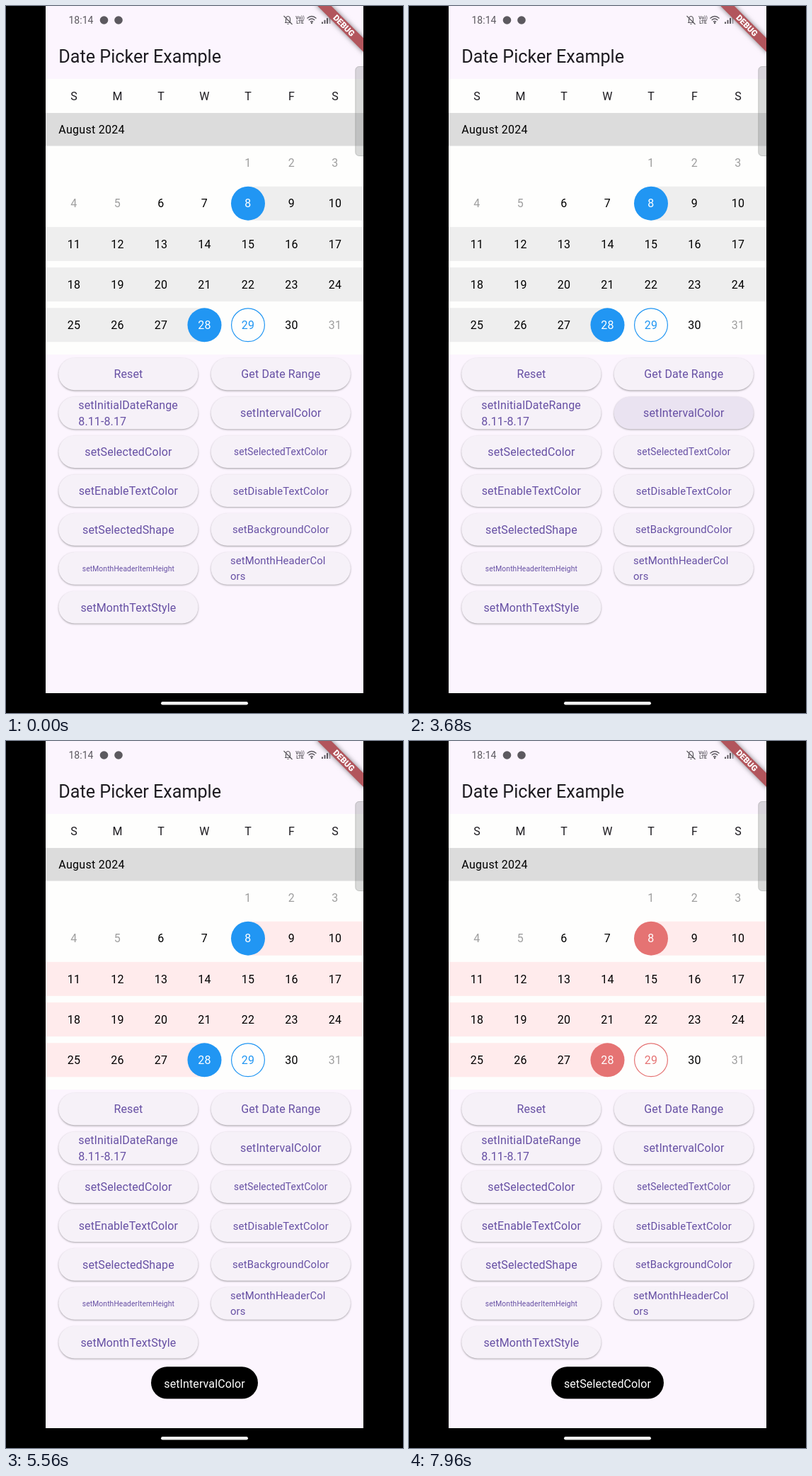
Write an HTML page with a canvas that moves like this. It is 561 by 998 pixels and loops after 8 s.

```html
<!DOCTYPE html>
<html lang="en">
<head>
<meta charset="utf-8">
<title>Date Picker Example</title>
<style>
html, body { margin: 0; width: 100%; height: 100%; overflow: hidden; background: #000; }
canvas { display: block; width: 561px; height: 998px; }
</style>
</head>
<body>
<canvas id="stage" width="561" height="998"></canvas>
<script>
const ctx = document.getElementById('stage').getContext('2d');
const LOOP = 8000;
const UNIT = 449 / 392.7; // stage pixels per logical pixel
const LEFT = 56, RIGHT = 505, BOTTOM = 970;
const BODY = 14 * UNIT;
const INK = '#1d1b20', PURPLE = '#6750a4';
const BUTTON = { width: 197.2, height: 45.7, top: 496.6, step: 54.87, columns: [74.3, 289.7] };

// Labels in reading order, two per row: [lines, logical font size]
const BUTTONS = [
  [['Reset'], 14], [['Get Date Range'], 14],
  [['setInitialDateRange', '8.11-8.17'], 14], [['setIntervalColor'], 14],
  [['setSelectedColor'], 14], [['setSelectedTextColor'], 12],
  [['setEnableTextColor'], 14], [['setDisableTextColor'], 13],
  [['setSelectedShape'], 14], [['setBackgroundColor'], 13],
  [['setMonthHeaderItemHeight'], 9], [['setMonthHeaderCol', 'ors'], 13],
  [['setMonthTextStyle'], 14],
];
const TAPS = [
  { button: 3, press: 3480, release: 3715 },
  { button: 4, press: 5570, release: 6080 },
];
const TOAST_TIME = 2000, TOAST_FADE = 256;

const clamp = v => Math.max(0, Math.min(1, v));
const ramp = (t, from, to) => clamp((t - from) / (to - from));
const smooth = v => v * v * (3 - 2 * v);
const decelerate = v => 1 - (1 - v) ** 2;

function text(str, x, y, { size = BODY, color = INK, align = 'center', spacing = 0.11, weight = 400 } = {}) {
  ctx.font = `${weight} ${size}px Roboto, sans-serif`;
  ctx.letterSpacing = `${spacing}px`;
  ctx.textAlign = align;
  ctx.fillStyle = color;
  ctx.fillText(str, x, y + size * 0.35);
}

function rect(x, y, w, h, color) {
  ctx.fillStyle = color;
  ctx.fillRect(x, y, w, h);
}

function pill(x, y, w, h, color, radius = h / 2) {
  ctx.beginPath();
  ctx.roundRect(x, y, w, h, radius);
  ctx.fillStyle = color;
  ctx.fill();
}

function disc(x, y, r, color) {
  ctx.beginPath();
  ctx.arc(x, y, r, 0, Math.PI * 2);
  ctx.fillStyle = color;
  ctx.fill();
}

function strokePath(path, color, width) {
  ctx.strokeStyle = color;
  ctx.lineWidth = width;
  ctx.stroke(new Path2D(path));
}

function drawStatusBar() {
  const gray = '#5c595f';
  text('18:14', 88.5, 20, { size: 14, color: gray, align: 'left', spacing: 0 });
  disc(138.5, 20, 5.8, gray);
  disc(159, 20, 5.8, gray);
  strokePath('M394 23.5H403M395.5 23V18.5Q395.5 15 398.5 14.5Q401.5 15 401.5 18.5V23M397.5 25.5H399.5M392.5 14L404.5 26', gray, 1.2);
  text('Vo))', 415.5, 16.5, { size: 6.5, color: gray, spacing: 0, weight: 700 });
  text('LTE', 415.5, 23, { size: 6.5, color: gray, spacing: 0, weight: 700 });
  strokePath('M425.5 17.5Q432 11.5 438.5 17.5M427.7 20Q432 16 436.3 20M430 22.4Q432 20.5 434 22.4', gray, 1.4);
  disc(432, 24, 1.2, gray);
  for (let i = 0; i < 4; i++) rect(446 + i * 3.5, 22.5 - i * 2.7, 2, 2.5 + i * 2.7, i < 3 ? gray : '#aaa6ac');
  pill(466, 14, 7, 12, '#2b292d', 1.5);
}

function drawDebugBanner() {
  ctx.save();
  ctx.beginPath();
  ctx.rect(LEFT, 0, RIGHT - LEFT, BOTTOM);
  ctx.clip();
  ctx.translate(RIGHT, 0);
  ctx.rotate(Math.PI / 4);
  ctx.scale(UNIT, UNIT);
  ctx.shadowColor = 'rgba(0,0,0,.5)';
  ctx.shadowBlur = 7;
  rect(-42, 28, 84, 12, '#b2555c');
  ctx.shadowColor = 'transparent';
  text('DEBUG', 0, 34, { size: 10.2, color: '#fff', spacing: 0, weight: 900 });
  ctx.restore();
}

function drawScrollHandle() {
  ctx.beginPath();
  ctx.roundRect(493.8, 85.5, 11.2, 126, [5, 0, 0, 5]);
  ctx.fillStyle = 'rgba(115,120,118,.27)';
  ctx.fill();
  ctx.strokeStyle = 'rgba(115,120,118,.35)';
  ctx.lineWidth = 1;
  ctx.stroke();
}

function drawCalendar(interval, selected) {
  const columnX = c => 96 + c * 61.5;
  const rowY = r => 221.5 + r * 57.2;
  const half = 24;
  rect(LEFT, 103, RIGHT - LEFT, 389, '#fefefd');
  [...'SMTWTFS'].forEach((day, c) => text(day, columnX(c), 127.5));
  rect(LEFT, 151, RIGHT - LEFT, 46.5, '#dcdcdc');
  text('August 2024', 74.3, 174.5, { color: '#000', align: 'left', spacing: 0.286 });

  for (let r = 1; r < 5; r++) {
    const from = r === 1 ? columnX(4) : LEFT;
    const to = r === 4 ? columnX(3) : RIGHT;
    rect(from, rowY(r) - half, to - from, half * 2, interval);
  }
  for (let day = 1; day <= 31; day++) {
    const cell = day + 3;
    const x = columnX(cell % 7), y = rowY(Math.floor(cell / 7));
    let color = day < 6 || day > 30 ? '#9e9e9e' : '#000';
    if (day === 8 || day === 28) {
      disc(x, y, half, selected);
      color = '#fff';
    } else if (day === 29) {
      ctx.beginPath();
      ctx.arc(x, y, half - 0.6, 0, Math.PI * 2);
      ctx.strokeStyle = color = selected;
      ctx.lineWidth = 1.2;
      ctx.stroke();
    }
    text(String(day), x, y, { color, spacing: 0.286 });
  }
}

function pressAmount(index, t) {
  const tap = TAPS.find(item => item.button === index);
  if (!tap) return 0;
  const fadeIn = smooth(ramp(t, tap.press + 60, tap.press + 260));
  const fadeOut = smooth(ramp(t, tap.release + 200, tap.release + 520));
  return fadeIn * (1 - fadeOut);
}

function drawButton([lines, logicalSize], index, t) {
  const { width, height, top, step, columns } = BUTTON;
  const x = columns[index % 2], y = top + Math.floor(index / 2) * step;
  ctx.save();
  ctx.shadowColor = 'rgba(0,0,0,.33)';
  ctx.shadowBlur = 2.5;
  ctx.shadowOffsetY = 1.1;
  pill(x, y, width, height, '#f6f1f8');
  ctx.restore();
  const pressed = pressAmount(index, t);
  if (pressed > 0) pill(x, y, width, height, `rgba(103,80,164,${0.11 * pressed})`);

  const size = logicalSize * UNIT;
  const style = { size, color: PURPLE };
  const middle = y + height / 2 + 0.3;
  if (lines.length === 1) {
    text(lines[0], x + width / 2, middle, style);
  } else {
    const indent = x + (logicalSize === 14 ? 28 : 27.2);
    const gap = logicalSize === 14 ? 11.4 : 11;
    lines.forEach((line, i) => text(line, indent, middle + (i * 2 - 1) * gap, { ...style, align: 'left' }));
  }
}

function drawToast({ button, release }, t) {
  const end = release + TOAST_TIME;
  const progress = t < end ? ramp(t, release, release + TOAST_FADE) : 1 - ramp(t, end, end + TOAST_FADE);
  if (progress <= 0) return;
  const shown = decelerate(progress);
  const label = BUTTONS[button][0][0];
  const width = button === 3 ? 151 : 159;
  const center = (LEFT + RIGHT) / 2;
  ctx.save();
  ctx.globalAlpha = shown;
  ctx.translate(0, -40 * UNIT * (1 - shown));
  pill(center - width / 2, 883.3, width, 45.3, '#000');
  text(label, center, 907, { color: '#fff' });
  ctx.restore();
}

function draw(t) {
  rect(0, 0, 561, 998, '#000');
  rect(LEFT, 0, RIGHT - LEFT, BOTTOM, '#fcf5fe');
  drawStatusBar();
  text('Date Picker Example', 74.3, 70.8, { size: 22 * UNIT, align: 'left', spacing: 0 });
  drawCalendar(
    t < TAPS[0].release ? '#eeeeee' : '#ffebec',
    t < TAPS[1].release ? '#2196f3' : '#e57373'
  );
  BUTTONS.forEach((button, i) => drawButton(button, i, t));
  TAPS.forEach(tap => drawToast(tap, t));
  drawScrollHandle();
  drawDebugBanner();
  pill(219, 982, 123, 4.6, '#f2f2f2');
}

function tick() {
  draw(performance.now() % LOOP);
  requestAnimationFrame(tick);
}
tick();
</script>
</body>
</html>
```
